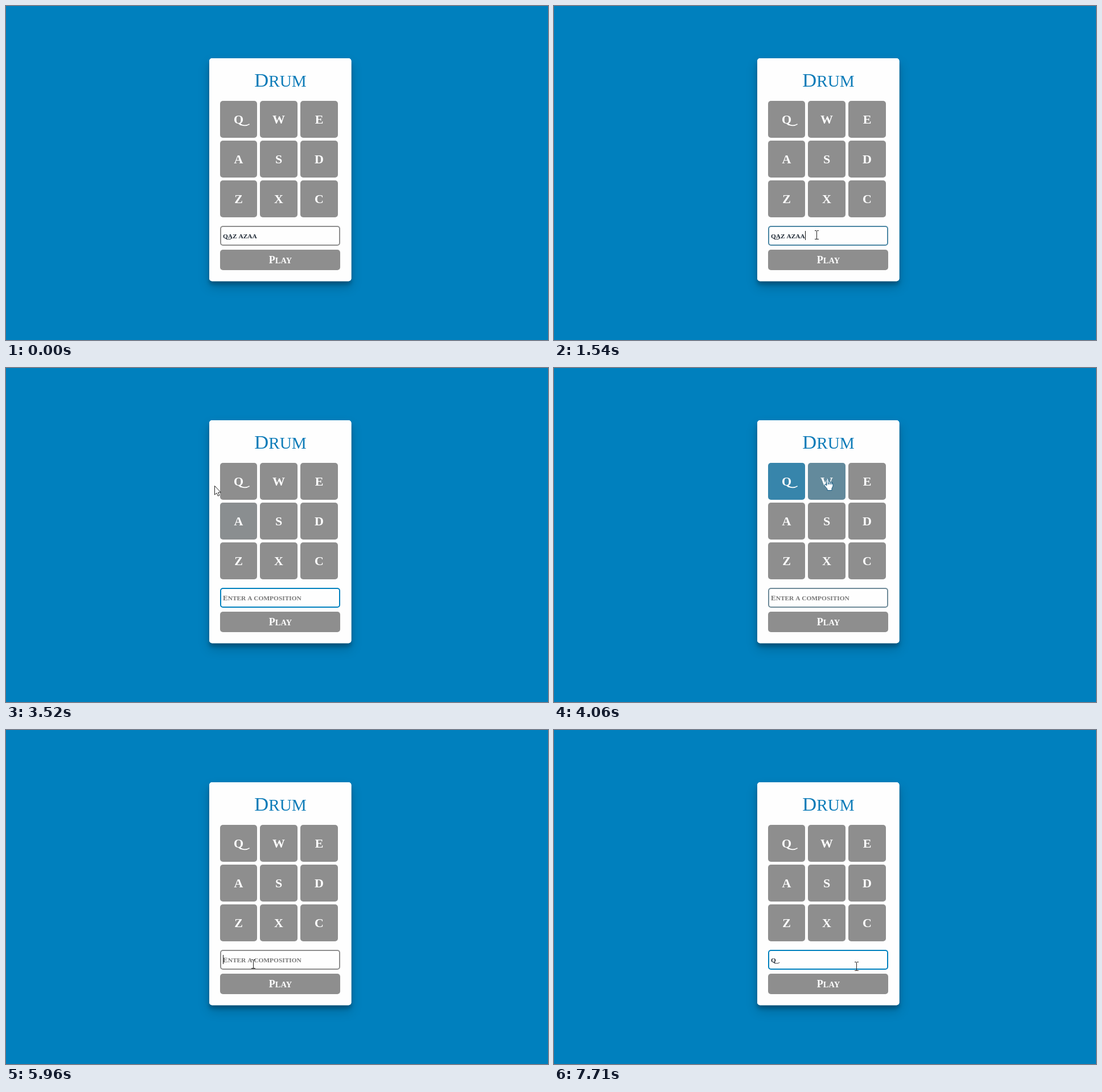
An HTML page with a canvas for the animation above (7.99 s loop, 952 by 588 pixels).

```html
<!DOCTYPE html>
<html lang="en">
<head>
<meta charset="utf-8">
<title>Drum</title>
<style>
html, body { margin: 0; width: 100%; height: 100%; overflow: hidden; background: #0080be; }
canvas { display: block; }
</style>
</head>
<body>
<canvas id="stage" width="952" height="588"></canvas>
<script>
const ctx = document.getElementById('stage').getContext('2d');
const LOOP = 7990, FADE = 400;
const GRAY = [142, 142, 142], BLUE = [0, 128, 190];
const PAPER = '#fefefe', INK = '#1d2733';
const FACE = '"Liberation Serif", "Noto Serif", serif';

const card = { x: 357, y: 92, w: 249.5, h: 392.5 };
const field = { x: 376, y: 387, w: 211, h: 35, spans: [[1430, 3870], [5960, LOOP]] };
const button = { x: 376, y: 429, w: 211, h: 36, spans: [] };
const keys = [...'QWEASDZXC'].map((name, i) => {
  const col = i % 3, x = Math.floor(376 + 70.6 * col);
  return { name, x, y: 167 + 70 * Math.floor(i / 3), w: col ? 66 : 65, h: 65, spans: [] };
});

// pointer moves: start, end, where it arrives; it rests in between
const home = { x: 825, y: 578 };
const moves = [
  [120, 400, 575, 475], [400, 740, 451, 401], [1000, 1070, 461, 403], [2030, 2510, 468, 411],
  [3040, 3420, 366, 207], [3520, 3800, 403, 195], [3870, 4060, 479, 194],
  [4060, 4120, 548, 200], [4120, 4270, 550, 335], [4270, 4420, 514, 352], [4420, 4640, 434, 383],
  [4680, 4820, 422, 401], [5150, 5290, 434, 412], [5960, 6240, 530, 424], [6430, 6500, 531, 416]
];

function pointerAt(t) {
  let { x, y } = home;
  for (const [start, end, toX, toY] of moves) {
    if (t < start) break;
    const k = Math.min(1, (t - start) / (end - start));
    x += (toX - x) * k;
    y += (toY - y) * k;
  }
  return { x: Math.round(x), y: Math.round(y) };
}

const inside = (p, b) => p.x >= b.x && p.x < b.x + b.w && p.y >= b.y && p.y < b.y + b.h;

// collect the times at which the pointer hovers each control
for (const b of [...keys, button]) {
  let on = null;
  for (let t = 0; t < LOOP; t += 5) {
    const over = inside(pointerAt(t), b);
    if (over && on === null) on = t;
    if (!over && on !== null) { b.spans.push([on, t]); on = null; }
  }
}
keys[0].spans.push([7300, 7440]);

// the CSS "ease" curve
function ease(p) {
  if (p <= 0) return 0;
  if (p >= 1) return 1;
  let lo = 0, hi = 1, s = 0.5;
  for (let i = 0; i < 20; i++) {
    s = (lo + hi) / 2;
    if (0.75 * s * (1 - s) + s * s * s < p) lo = s; else hi = s;
  }
  const r = 1 - s;
  return 0.3 * s * r * r + 3 * s * s * r + s * s * s;
}

// share of blue, fading in during a span and back out after it
function tint(b, t) {
  let v = 0;
  for (const [on, off] of b.spans) {
    if (t <= on) continue;
    const peak = ease((Math.min(t, off) - on) / FADE);
    v = t < off ? peak : peak * (1 - ease((t - off) / (FADE * peak)));
  }
  return `rgb(${GRAY.map((g, i) => Math.round(g + (BLUE[i] - g) * v))})`;
}

function box(b, fill, r = 5) {
  ctx.fillStyle = fill;
  ctx.beginPath();
  ctx.roundRect(b.x, b.y, b.w, b.h, r);
  ctx.fill();
}

function shadow(b, drop, blur, alpha) {
  ctx.save();
  ctx.shadowColor = `rgba(0,0,0,${alpha})`;
  ctx.shadowBlur = blur;
  ctx.shadowOffsetY = drop;
  box(b, PAPER);
  ctx.restore();
}

// capitals at one size, lowercase drawn as smaller capitals
function caps(text, x, y, big, small, color, weight = 400, center = false) {
  const runs = text.match(/[A-Z]+|[^A-Z]+/g) || [];
  const width = s => {
    ctx.font = `${weight} ${/[A-Z]/.test(s) ? big : small}px ${FACE}`;
    return ctx.measureText(s.toUpperCase()).width;
  };
  const total = runs.reduce((sum, s) => sum + width(s), 0);
  let at = center ? x - total / 2 : x;
  ctx.fillStyle = color;
  for (const s of runs) {
    const w = width(s);
    ctx.fillText(s.toUpperCase(), at, y);
    at += w;
  }
  return total;
}

// long tail of the Q
function swash(x, y, size, color) {
  ctx.strokeStyle = color;
  ctx.lineWidth = size * 0.075;
  ctx.beginPath();
  ctx.moveTo(x, y);
  ctx.bezierCurveTo(x + size * 0.25, y + size * 0.17, x + size * 0.55, y + size * 0.27, x + size * 0.87, y + size * 0.06);
  ctx.stroke();
}

function outline(d, line) {
  const p = new Path2D(d);
  ctx.fillStyle = '#fff';
  ctx.fill(p);
  ctx.strokeStyle = line;
  ctx.lineWidth = 1;
  ctx.lineJoin = 'round';
  ctx.stroke(p);
}

function drawArrow() {
  outline('M.5 .5V16.2L4 13L6.3 18.3L8.8 17.2L6.6 12H11.3Z', '#222');
}

function drawHand() {
  outline('M-1 13V2Q.5 -1 2 2V6Q4 5 5 7Q7 6 8 8Q10 8 10 10V14L8 18V21.5H0V19L-5 13Q-5 9 -1 13Z', '#165a82');
  for (let x = 2; x < 9; x += 3) ctx.strokeRect(x, 7, 0, 4);
}

function drawBeam() {
  ctx.fillStyle = '#222';
  ctx.fillRect(0, -7, 1, 15);
  for (const y of [-8, 7]) {
    ctx.fillRect(-3, y, 3, 1);
    ctx.fillRect(1, y, 3, 1);
  }
}

function drawPointer(t) {
  if (t < moves[0][0]) return;
  const p = pointerAt(t);
  ctx.save();
  ctx.translate(p.x, p.y);
  if (inside(p, field)) drawBeam();
  else if ([...keys, button].some(b => inside(p, b))) drawHand();
  else drawArrow();
  ctx.restore();
}

function typed(t) {
  if (t < 2440) return 'QAZ AZAA';
  if (t < 2710) return 'QAZ';
  return t < 7100 ? '' : 'Q';
}

function caretOn(t) {
  if (t < 5960) return t >= 1400 && t < 3240;
  const since = t < 7100 ? t - 5960 : t - 7100;
  return since % 1060 < 530;
}

function drawField(t) {
  box(field, tint(field, t));
  box({ x: field.x + 2, y: field.y + 2, w: field.w - 4, h: field.h - 4 }, PAPER, 3);

  const text = typed(t);
  const w = caps(text, 381, 408.5, 11.4, 11.4, INK, 700);
  if (text) swash(385, 408.5, 13, INK);
  else if (t >= 3040) caps('Enter a composition', 381, 408.5, 13, 11.4, '#757575', 700);

  if (caretOn(t)) {
    ctx.fillStyle = '#111';
    ctx.fillRect(Math.round(381 + w), 396, 1, 16);
  }
}

function draw(t) {
  ctx.fillStyle = `rgb(${BLUE})`;
  ctx.fillRect(0, 0, 952, 588);
  shadow(card, 10, 20, 0.19);
  shadow(card, 6, 6, 0.23);

  caps('Drum', 482, 142, 34.5, 29.2, '#0b7bb8', 400, true);

  for (const k of keys) {
    box(k, tint(k, t));
    const cx = k.x + k.w / 2, base = k.y + 39.5;
    caps(k.name, cx, base, 22, 22, '#fff', 700, true);
    if (k.name === 'Q') swash(cx, base, 22, '#fff');
  }

  drawField(t);
  box(button, tint(button, t));
  caps('Play', 482, 452.5, 18, 14.5, '#fff', 700, true);
  drawPointer(t);
}

const begin = performance.now();
function tick() {
  draw((performance.now() - begin) % LOOP);
  requestAnimationFrame(tick);
}
tick();
</script>
</body>
</html>
```
